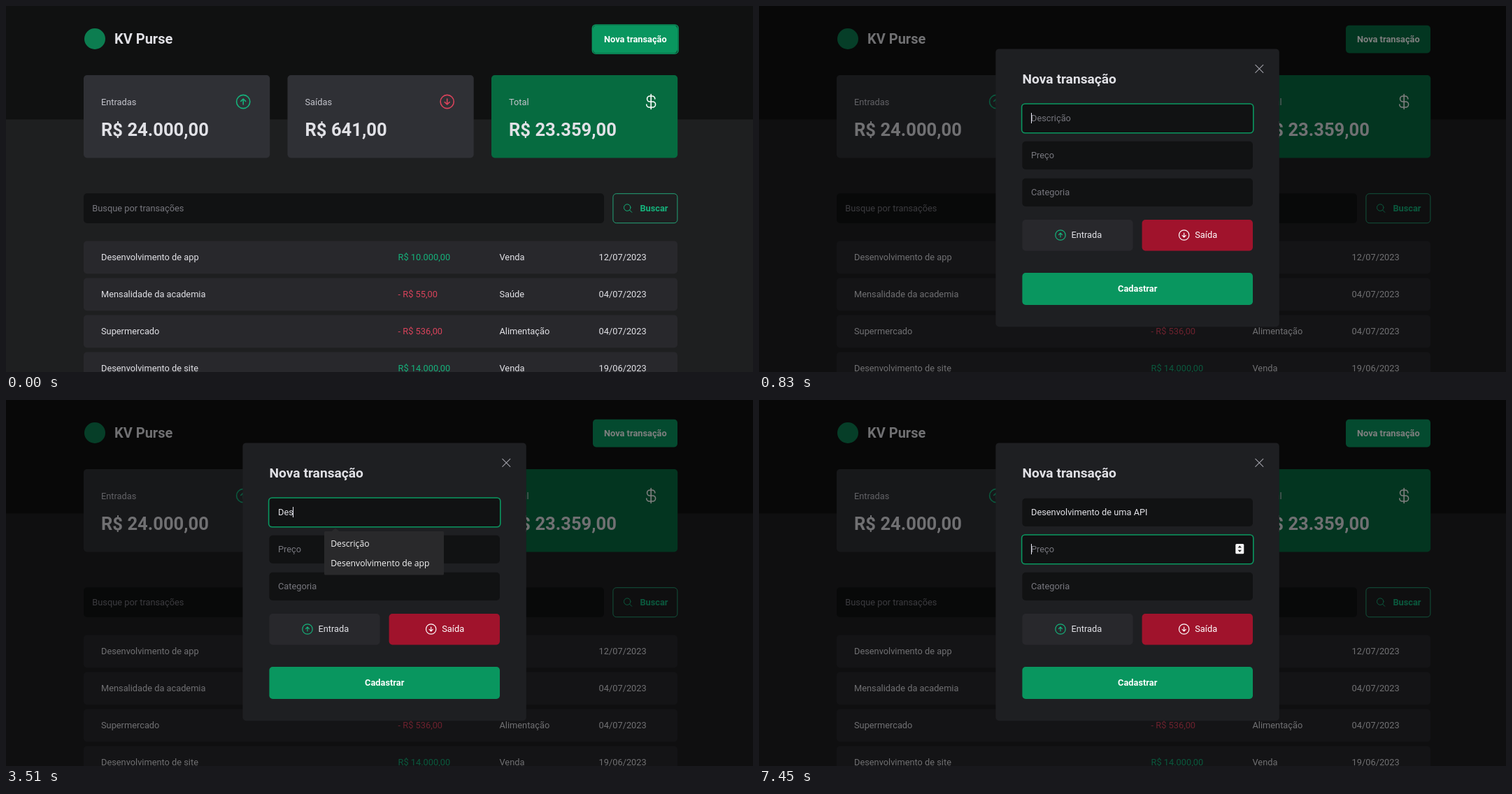
Write an HTML page that moves like this. It is 1068 by 524 pixels and loops after 8 s.

```html
<!DOCTYPE html>
<html lang="pt-BR">
<head>
<meta charset="utf-8">
<title>Nova transação</title>
<style>
  html, body { margin: 0; width: 100%; height: 100%; overflow: hidden; background: #1e1f20; }
  svg { display: block; width: 1068px; height: 524px; }
  text { font: 12.8px Roboto, sans-serif; fill: #e1e1e6; white-space: pre; }
  .bold { font-weight: 700; }
  .icon { fill: none; stroke-width: 16; stroke-linecap: round; stroke-linejoin: round; }
  .hint { fill: #77777e; }
  .menu { font: 12.2px "Open Sans", "Noto Sans", sans-serif; fill: #f4f4f4; }
</style>
</head>
<body>
<svg id="stage" viewBox="0 0 1068 524"></svg>
<script>
const DURATION = 8000;
const GREEN = '#09965f', LIGHT = '#15b27b', RED = '#d9435b';
const FIELD = '#111213', PANEL = '#1e1f22', ROW = '#28282c';
const stage = document.getElementById('stage');

function add(tag, attrs, parent = stage) {
  const node = document.createElementNS('http://www.w3.org/2000/svg', tag);
  for (const key in attrs) node.setAttribute(key, attrs[key]);
  parent.appendChild(node);
  return node;
}
const group = (parent) => add('g', {}, parent);
const box = (x, y, width, height, fill, parent, extra) =>
  add('rect', { x, y, width, height, rx: 4.8, fill, ...extra }, parent);
const ring = (x, y, width, height, parent) =>
  box(x, y, width, height, 'none', parent, { stroke: GREEN, 'stroke-width': 1.6 });
function label(x, y, content, parent, extra) {
  const node = add('text', { x, y, ...extra }, parent);
  node.textContent = content;
  return node;
}

// Icons are drawn on a 256-unit grid centred on (cx, cy).
const CIRCLE = 'M224 128a96 96 0 1 1-192 0a96 96 0 1 1 192 0';
const ICONS = {
  up: CIRCLE + 'M94 122L128 88L162 122M128 88V168',
  down: CIRCLE + 'M94 134L128 168L162 134M128 88V168',
  dollar: 'M128 24V232M184 88a40 40 0 0 0-40-40H112a40 40 0 0 0 0 80h40a40 40 0 0 1 0 80H104a40 40 0 0 1-40-40',
  search: 'M192 112a76 76 0 1 1-152 0a76 76 0 1 1 152 0M170 170L220 220',
  close: 'M48 48L208 208M208 48L48 208'
};
function icon(name, cx, cy, size, stroke, parent) {
  const k = size / 256;
  add('path', {
    class: 'icon', d: ICONS[name], stroke,
    transform: `translate(${cx - size / 2} ${cy - size / 2}) scale(${k})`
  }, parent);
}

// Page
box(0, 0, 1068, 524, '#1e1f20', stage, { rx: 0 });
box(0, 0, 1068, 162.4, '#101111', stage, { rx: 0 });
add('circle', { cx: 127, cy: 47, r: 15, fill: '#0c7d50' });
label(155, 54, 'KV Purse', stage, { class: 'bold', style: 'font-size:20px' });

const newButton = box(839, 27.8, 121, 39.6, GREEN);
const newRing = ring(838.4, 27, 122.6, 41.2);
label(855, 52, 'Nova transação', stage, { class: 'bold', style: 'fill:#fff' });

[
  [111, 'Entradas', 'R$ 24.000,00', 'up', LIGHT, '#2f3035'],
  [402.5, 'Saídas', 'R$ 641,00', 'down', RED, '#2f3035'],
  [694, 'Total', 'R$ 23.359,00', 'dollar', '#fff', '#066b40']
].forEach(([x, name, value, symbol, color, fill]) => {
  box(x, 99, 266.2, 118.4, fill);
  label(x + 25, 141.5, name, stage, { style: 'fill:#c4c4cc' });
  label(x + 25, 186, value, stage, { class: 'bold', style: 'font-size:25.6px' });
  icon(symbol, x + 228.2, 137, 25.6, color);
});

box(111, 268.3, 744, 42.6, FIELD);
label(123.3, 294.4, 'Busque por transações', stage, { class: 'hint' });
box(867.9, 268.7, 92, 42, 'none', stage, { stroke: '#24a377', 'stroke-width': 1 });
icon('search', 889, 289.6, 16, LIGHT);
label(906.4, 294.4, 'Buscar', stage, { class: 'bold', style: `fill:${LIGHT}` });

[
  ['Desenvolvimento de app', 'R$ 10.000,00', 'Venda', '12/07/2023'],
  ['Mensalidade da academia', '- R$ 55,00', 'Saúde', '04/07/2023'],
  ['Supermercado', '- R$ 536,00', 'Alimentação', '04/07/2023'],
  ['Desenvolvimento de site', 'R$ 14.000,00', 'Venda', '19/06/2023']
].forEach(([name, price, kind, date], i) => {
  const y = 336.4 + 53 * i, base = y + 27.6;
  box(111, y, 849, 46.8, ROW);
  label(136, base, name);
  label(560.6, base, price, stage, { style: `fill:${price[0] === '-' ? RED : LIGHT}` });
  label(705.5, base, kind);
  label(847.6, base, date);
});

// Modal
const modal = group();
box(0, 0, 1068, 524, '#000', modal, { rx: 0, opacity: 0.5 });
box(338.4, 61.4, 405.4, 397.8, PANEL, modal);
label(376.5, 111, 'Nova transação', modal, { class: 'bold', style: 'font-size:19.2px' });
icon('close', 715.3, 89.8, 17.6, '#a0a0a8', modal);

const hints = ['Descrição', 'Preço', 'Categoria'].map((name, i) => {
  const y = 140.8 + 53 * i;
  box(376.4, y, 329.6, 40.2, FIELD, modal);
  return label(389, y + 24.4, name, modal, { class: 'hint' });
});
const focusRing = ring(375.6, 140, 331.2, 41.8, modal);

box(376.4, 306, 158.2, 44.4, ROW, modal);
icon('up', 431, 328, 19.2, LIGHT, modal);
label(446.4, 332.4, 'Entrada', modal);
box(547.6, 306, 158.4, 44.4, '#a0132c', modal);
icon('down', 607.7, 328, 19.2, '#fff', modal);
label(623.2, 332.4, 'Saída', modal, { style: 'fill:#fff' });
box(376.4, 382, 329.6, 46, GREEN, modal);
label(541.2, 409.4, 'Cadastrar', modal, { class: 'bold', style: 'fill:#fff', 'text-anchor': 'middle' });

const typed = label(389, 165.2, '', modal);
const marks = add('path', { fill: 'none', stroke: '#c4141f', 'stroke-width': 1.6 }, modal);
const caret = add('rect', { width: 1, height: 15, fill: '#e8e8f4' }, modal);

const spinner = group(modal);
box(681.3, 206, 12, 14.2, '#f4f4f4', spinner, { rx: 1.5 });
add('path', { d: 'M684.6 211.4L687.3 208.4L690 211.4ZM684.6 214.8L687.3 217.8L690 214.8Z', fill: '#222' }, spinner);

const menu = group(modal);
add('path', { d: 'M465.5 188L471 183.4L476.5 188Z', fill: '#29292b' }, menu);
const menuBox = box(455, 188, 171, 62.6, '#29292b', menu, { rx: 1.5 });
const menuItems = [209.6, 238].map(y => label(464.2, y, '', menu, { class: 'menu' }));

// Timeline
const PHRASE = 'Desenvolvimento de uma API';
const KEY_TIMES = [
  3210, 3330, 3450, 3660, 3800, 3950, 4190, 4260, 4360, 4440, 4540, 4650, 4770,
  4990, 5050, 5270, 5400, 5480, 5620, 5810, 5950, 6090, 6280, 6640, 6800, 7000
];
const MARKS = [[5300, 0, 15], [5640, 16, 18], [6310, 19, 22]];
const HOVER = 440, OPEN = 830, NEXT_FIELD = 7450;

const pen = document.createElement('canvas').getContext('2d');
function widthOf(text) {
  pen.font = '12.8px Roboto, sans-serif';
  return pen.measureText(text).width;
}
const show = (node, on) => node.setAttribute('display', on ? 'inline' : 'none');
const between = (t, from, to) => t >= from && t < to;
const ramp = (t, from, length) => Math.min(1, Math.max(0, (t - from) / length));
const ease = p => p * p * (3 - 2 * p);

function drawButton(t) {
  const dark = ease(ramp(t, HOVER, 200)) - ease(ramp(t, OPEN, 140));
  const mix = (a, b) => Math.round(a + (b - a) * dark);
  newButton.setAttribute('fill', `rgb(${mix(9, 7)},${mix(150, 109)},${mix(95, 67)})`);
  show(newRing, t < OPEN);
}

function drawMenu(t) {
  const single = t >= 3720;
  show(menu, between(t, 3270, 5850));
  menuBox.setAttribute('height', single ? 34.2 : 62.6);
  menuItems[0].textContent = single ? 'Desenvolvimento de app' : 'Descrição';
  menuItems[1].textContent = single ? '' : 'Desenvolvimento de app';
}

function drawFields(t) {
  const text = PHRASE.slice(0, KEY_TIMES.filter(k => k <= t).length);
  const onPrice = t >= NEXT_FIELD;
  typed.textContent = text;
  show(hints[0], !text);
  focusRing.setAttribute('y', onPrice ? 193 : 140);
  show(spinner, onPrice);

  caret.setAttribute('x', Math.floor(389 + (onPrice ? 0 : widthOf(text))));
  caret.setAttribute('y', onPrice ? 206 : 153);
  show(caret, !between(t, 1360, 1880) && !between(t, 2660, 3210));

  const lines = MARKS.filter(([at]) => t >= at && !onPrice).map(([, from, to]) =>
    `M${389 + widthOf(PHRASE.slice(0, from))} 167.6H${389 + widthOf(PHRASE.slice(0, to))}`);
  marks.setAttribute('d', lines.join(''));
}

function render(now) {
  const t = now % DURATION;
  drawButton(t);
  show(modal, t >= OPEN);
  drawMenu(t);
  drawFields(t);
}

const start = performance.now();
function tick() {
  render(performance.now() - start);
  requestAnimationFrame(tick);
}
tick();
</script>
</body>
</html>
```
